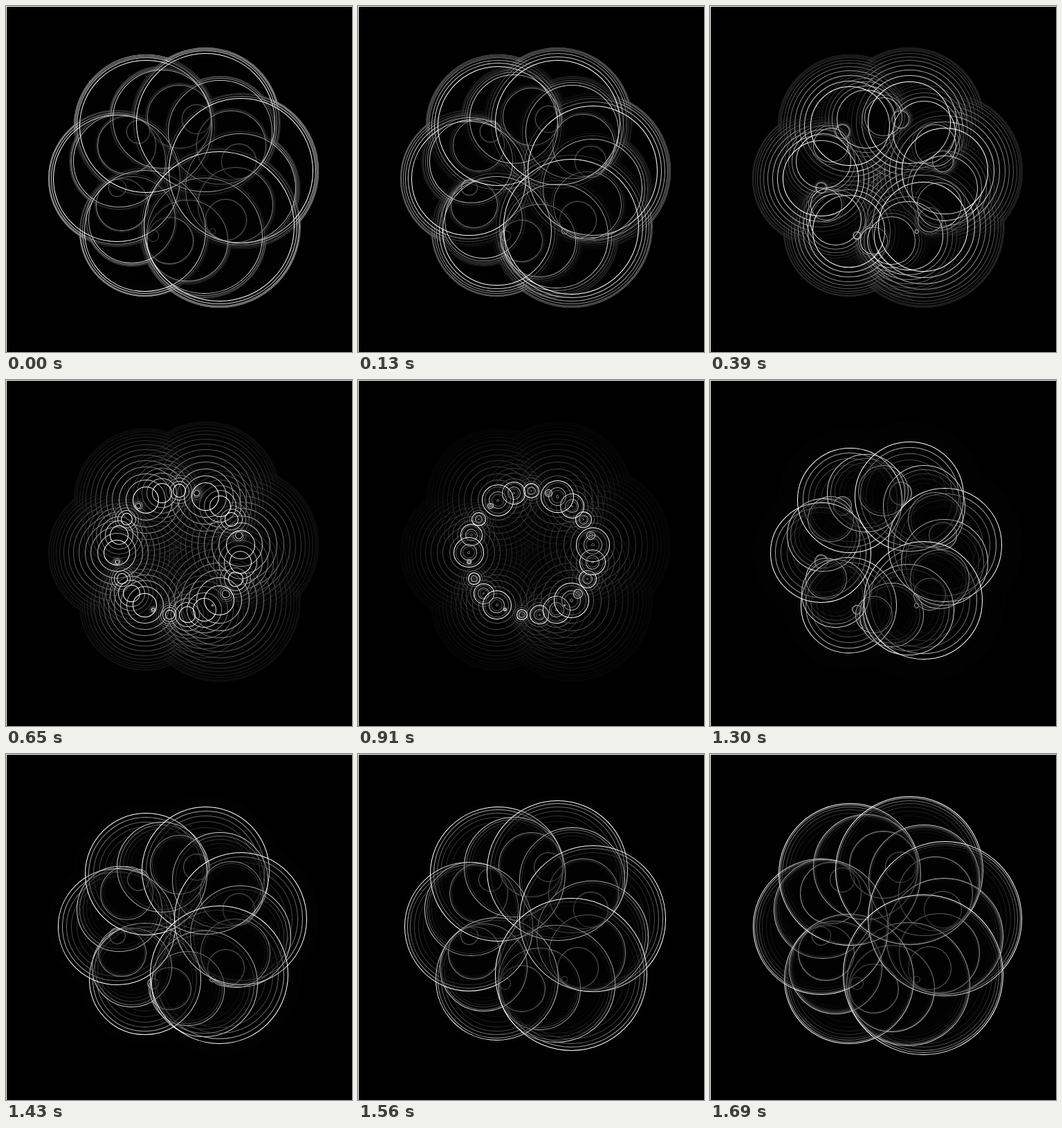
These frames come from a looping animation (500x500 px, 1.82 s). An HTML page with a canvas:

```html
<!DOCTYPE html>
<html lang="en">
<head>
<meta charset="utf-8">
<title>Pulsing rings</title>
<style>
  html, body { margin: 0; width: 100%; height: 100%; overflow: hidden; background: #000; }
  canvas { display: block; width: 500px; height: 500px; }
</style>
</head>
<body>
<canvas id="stage" width="500" height="500"></canvas>
<script>
const SIZE = 500, STEPS = 14, STEP_MS = 130;
const RINGS = 26, ORBIT = 90, GROWTH = 4.5;
const VEIL = 'rgba(0, 0, 0, 0.196)';
const WARMUP = 51; // passes drawn before the first visible step
const KAPPA = 0.5523;

const snap = v => Math.floor(v) + 0.5;

// Circle outline whose four extreme points and centre sit on pixel centres
function outline(g, cx, cy, r) {
  const x = snap(cx), y = snap(cy), k = r * KAPPA;
  const left = snap(cx - r), right = snap(cx + r);
  const top = snap(cy - r), bottom = snap(cy + r);
  g.beginPath();
  g.moveTo(right, y);
  g.bezierCurveTo(right, y + k, x + k, bottom, x, bottom);
  g.bezierCurveTo(x - k, bottom, left, y + k, left, y);
  g.bezierCurveTo(left, y - k, x - k, top, x, top);
  g.bezierCurveTo(x + k, top, right, y - k, right, y);
  g.closePath();
  g.stroke();
}

function ring(g, cx, cy, r) {
  g.beginPath();
  g.arc(cx, cy, r, 0, Math.PI * 2);
  g.fill();
  outline(g, cx, cy, r);
}

// One pass: veil the old picture, then draw every ring at phase n / 10
function pass(g, n) {
  g.fillRect(0, 0, SIZE, SIZE);
  g.strokeRect(0.5, 0.5, SIZE, SIZE);
  const swell = Math.abs(Math.sin(n / 10));
  for (let i = 1; i <= RINGS; i++) {
    ring(g, SIZE / 2 + ORBIT * Math.cos(i), SIZE / 2 + ORBIT * Math.sin(i), GROWTH * i * swell);
  }
}

function newLayer() {
  const c = document.createElement('canvas');
  c.width = c.height = SIZE;
  return c;
}

function buildSteps() {
  const layer = newLayer(), g = layer.getContext('2d');
  g.fillStyle = '#000';
  g.fillRect(0, 0, SIZE, SIZE);
  g.fillStyle = VEIL;
  g.strokeStyle = '#fff';
  g.lineWidth = 1.01; // just over 1 avoids thin hairline rendering

  const steps = [];
  for (let n = 0; steps.length < STEPS; n++) {
    pass(g, n);
    if (n >= WARMUP && (n - WARMUP) % 2 === 0) {
      const copy = newLayer();
      copy.getContext('2d').drawImage(layer, 0, 0);
      steps.push(copy);
    }
  }
  return steps;
}

const stage = document.getElementById('stage').getContext('2d');
const steps = buildSteps();
const start = performance.now();

function show() {
  const time = Math.max(0, performance.now() - start);
  stage.drawImage(steps[Math.floor(time / STEP_MS) % STEPS], 0, 0);
  requestAnimationFrame(show);
}
show();
</script>
</body>
</html>
```
